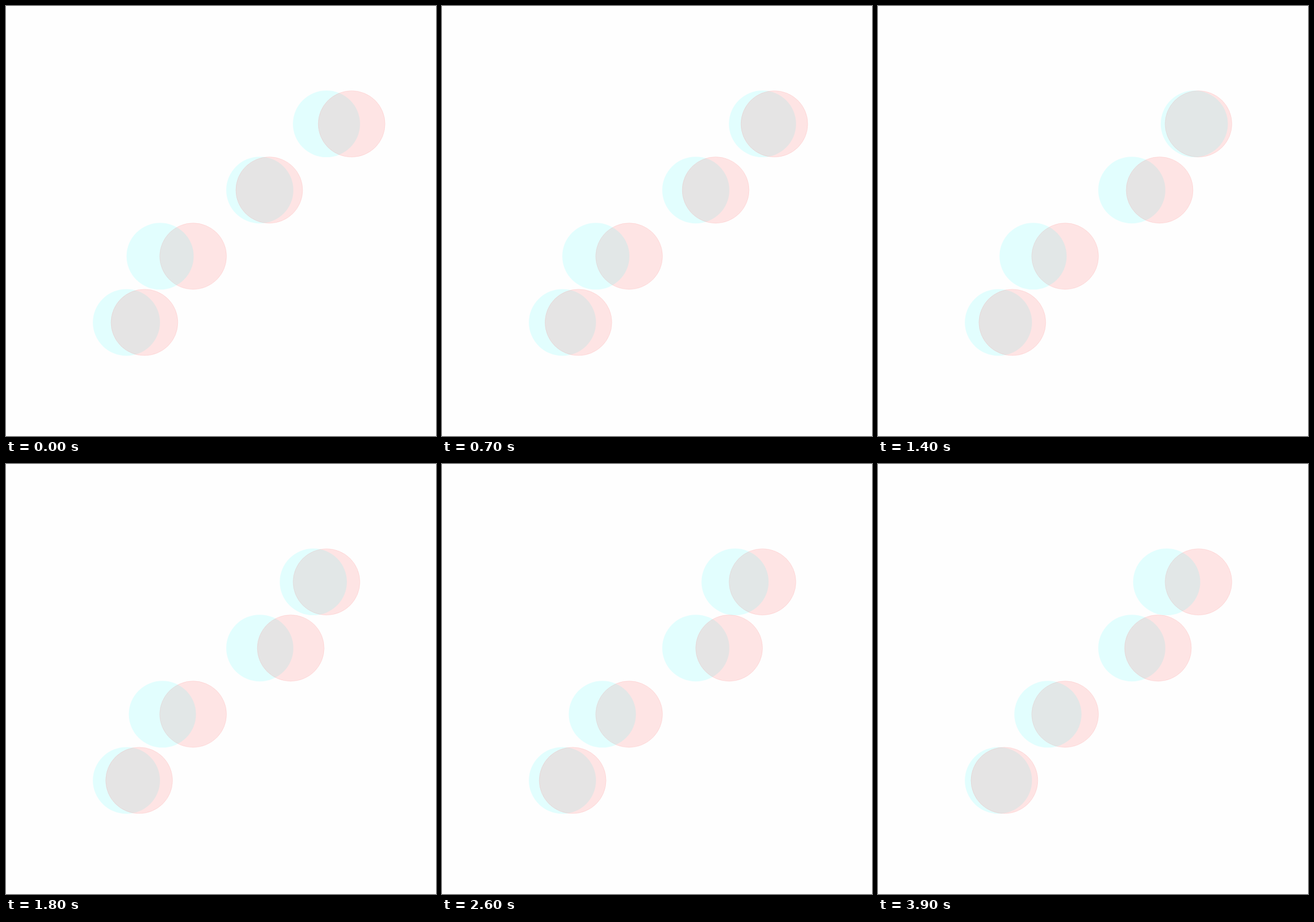
These frames come from a looping animation (748 px wide and 748 px high, 4 s). An HTML page with a canvas:

```html
<!DOCTYPE html>
<html lang="en">
<head>
<meta charset="utf-8">
<title>Shifting circles</title>
<style>
  html, body { margin: 0; width: 100%; height: 100%; overflow: hidden; background: #fefefe; }
  canvas { display: block; width: 748px; height: 748px; }
</style>
</head>
<body>
<canvas id="stage" width="748" height="748"></canvas>
<script>
const ctx = document.getElementById('stage').getContext('2d');
const LOOP = 4000, STEP = 100, SHIFT = 58;
const CYAN = 'rgba(0,255,255,.11)';
const RED = 'rgba(255,0,0,.1)';
const EDGE = 'rgba(255,0,0,.08)';

function disc(x, y, fill, edge) {
  ctx.beginPath();
  ctx.ellipse(x, y, edge ? 58.1 : 58.4, edge ? 57.7 : 58, 0, 0, Math.PI * 2);
  ctx.fillStyle = fill;
  ctx.fill();
  if (!edge) return;
  ctx.strokeStyle = edge;
  ctx.lineWidth = 1;
  ctx.stroke();
}

// Each row follows an odd harmonic; its sign decides which disc moves.
function draw(ms) {
  const phase = 1 + Math.floor((ms % LOOP) / STEP) * 0.01;
  ctx.fillStyle = '#fefefe';
  ctx.fillRect(0, 0, 748, 748);
  for (let row = 0; row < 4; row++) {
    const x = 209.5 + row * 116;
    const y = 550.4 - row * 115.1;
    const shift = SHIFT * Math.cos((2 * row + 1) * phase);
    const cyan = () => disc(x + Math.min(0, shift), y, CYAN);
    const red = () => disc(x + Math.max(0, shift), y, RED, EDGE);
    // The moving disc lies on top.
    if (shift > 0) { cyan(); red(); } else { red(); cyan(); }
  }
}

const start = performance.now();
function tick() {
  draw(performance.now() - start);
  requestAnimationFrame(tick);
}
tick();
</script>
</body>
</html>
```
